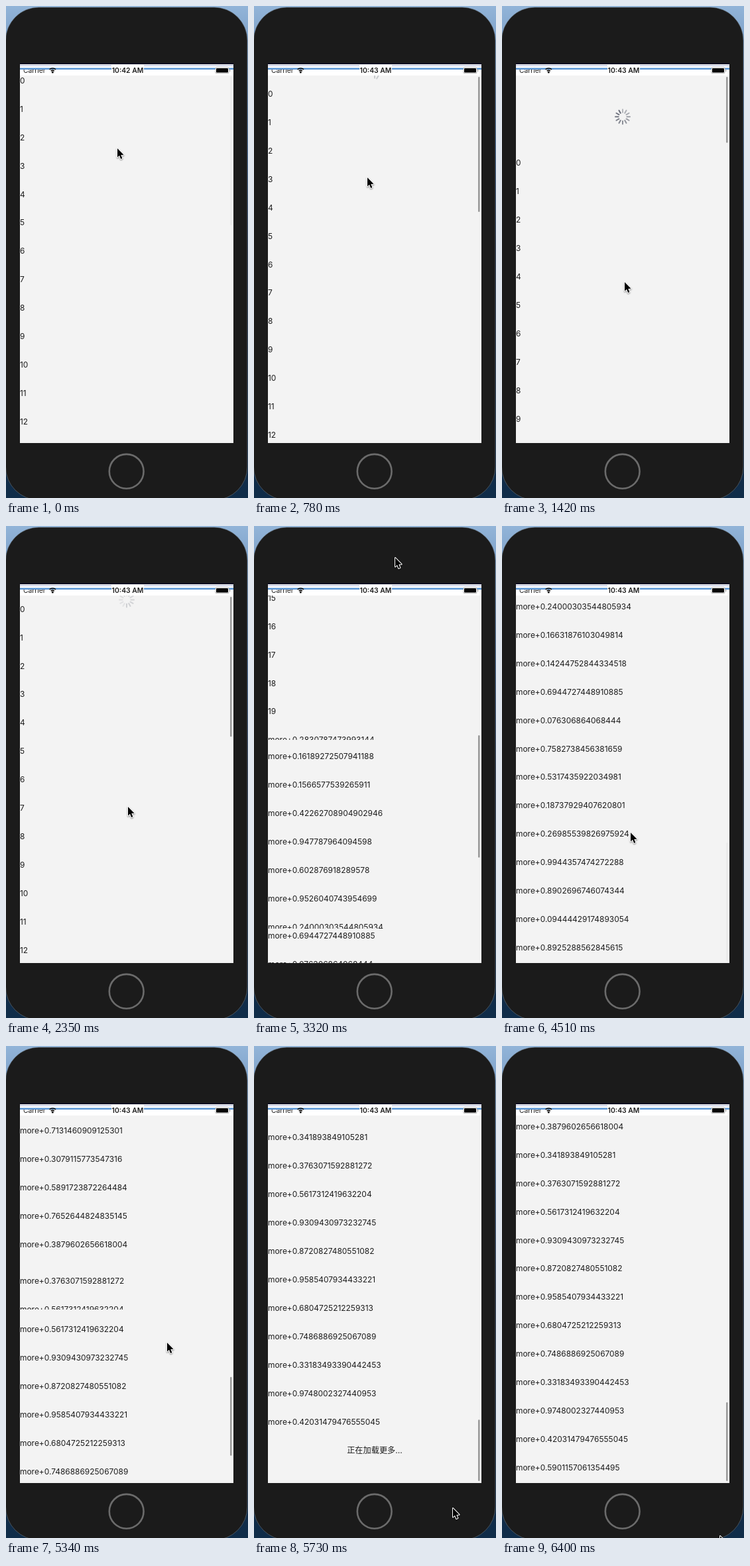
An HTML page with a canvas for the animation above (7.05 s loop, 365 by 743 pixels).

```html
<!DOCTYPE html>
<html lang="en">
<head>
<meta charset="utf-8">
<title>Pull to refresh</title>
<style>
html, body { margin: 0; width: 100%; height: 100%; overflow: hidden; background: #1b1b1b; }
canvas { display: block; }
</style>
</head>
<body>
<canvas id="stage" width="365" height="743"></canvas>
<script>
const ctx = document.getElementById('stage').getContext('2d');
const LOOP = 7050, STEP = 128;
const PITCH = 42.93;
const TOP = 105, BOTTOM = 660, LEFT = 21, WIDTH = 322, MID = 182;
const FONT = 'Inter, "Noto Sans CJK SC", "Noto Sans CJK", sans-serif';

const EASE = {
  line: p => p,
  in: p => p * p,
  out: p => p * (2 - p),
  smooth: p => p * p * (3 - 2 * p),
  hold: () => 0
};

// Pointer and scroll at the turning points; ease leads to the next one.
// Tears are bands [from y, extra scroll] of the screen drawn out of sync.
const POSES = [
  { t: 0, x: 168, y: 215, s: 0, ease: 'line' },
  { t: 390, x: 167, y: 205, s: 0, ease: 'line' },
  { t: 630, x: 168, y: 229, s: 0, ease: 'line' },
  { t: 1420, x: 185, y: 417, s: -124.5, ease: 'smooth' },
  { t: 1900, x: 184, y: 424, s: -51.5, ease: 'smooth' },
  { t: 2470, x: 184, y: 424, s: 0, ease: 'line' },
  { t: 2770, x: 183, y: 484, s: 0, ease: 'in' },
  { t: 3170, x: 207, y: 2, s: 420, ease: 'line' },
  { t: 3320, x: 213, y: 48, s: 648, ease: 'out', tears: [[323, 18], [608, 134]] },
  { t: 3860, x: 207, y: 433, s: 1171, ease: 'out' },
  { t: 4240, x: 198, y: 452, s: 1150, ease: 'line' },
  { t: 4510, x: 194, y: 463, s: 1150, ease: 'hold' },
  { t: 4790, x: 188, y: 496, s: 1150, ease: 'line' },
  { t: 4920, x: 183, y: 529, s: 1150, ease: 'in' },
  { t: 5220, x: 224, y: 200, s: 1640, ease: 'line' },
  { t: 5340, x: 243, y: 448, s: 1831, ease: 'out', tears: [[325, 30], [398, 0]] },
  { t: 5730, x: 300, y: 698, s: 2035, ease: 'out' },
  { t: 6400, x: 329, y: 740, s: 2008.7, ease: 'hold' }
];

const MORE = `2830787473993144 16189272507941188 1566577539265911 42262708904902946
  947787964094598 602876918289578 9526040743954699 24000303544805934 16631876103049814
  14244752844334518 6944727448910885 076306864068444 7582738456381659 5317435922034981
  18737929407620801 26985539826975924 9944357474272288 8902696746074344 09444429174893054
  8925288562845615 4718263905512847 6390172845527316 2057749381640925 7131460909125301
  3079115773547316 5891723872264484 7652644824835145 3879602656618004 341893849105281
  3763071592881272 5617312419632204 9309430973232745 8720827480551082 9585407934433221
  6804725212259313 7486886925067089 33183493390442453 9748002327440953 42031479476555045
  5901157061354495`.trim().split(/\s+/);
const ROWS = [...Array(20).keys()].map(String).concat(MORE.map(d => 'more+0.' + d));

// The picture advances in steps counted from the last turning point
function poseAt(t) {
  const i = POSES.findLastIndex(p => p.t <= Math.max(0, t));
  const a = POSES[i], b = POSES[i + 1] || a;
  const step = Math.floor((t - a.t) / STEP);
  const p = b === a ? 0 : EASE[a.ease](Math.max(0, step * STEP / (b.t - a.t)));
  const mix = k => a[k] + (b[k] - a[k]) * p;
  return { x: mix('x'), y: mix('y'), s: mix('s'), tears: step === 0 && a.tears || [] };
}

function rect(x, y, w, h, color) {
  ctx.fillStyle = color;
  ctx.fillRect(x, y, w, h);
}

function pill(x, y, w, h, r, color) {
  ctx.fillStyle = color;
  ctx.beginPath();
  ctx.roundRect(x, y, w, h, r);
  ctx.fill();
}

function arc(x, y, r, width, color, from = 0, to = 7) {
  ctx.strokeStyle = color;
  ctx.lineWidth = width;
  ctx.beginPath();
  ctx.arc(x, y, r, from, to);
  ctx.stroke();
}

function label(str, x, y, font, align = 'left') {
  ctx.font = font + ' ' + FONT;
  ctx.textAlign = align;
  ctx.fillStyle = '#1c1c1c';
  ctx.fillText(str, x, y);
}

function drawPhone() {
  const sky = ctx.createLinearGradient(0, 0, 0, 743);
  sky.addColorStop(0, '#92b4d8');
  sky.addColorStop(.3, '#3f679c');
  sky.addColorStop(.5, '#22304c');
  sky.addColorStop(1, '#0f2c49');
  rect(0, 0, 365, 743, sky);
  pill(-.5, 2, 364.5, 744, 50, '#1b1b1b');
  ctx.strokeStyle = 'rgba(110,122,134,.55)';
  ctx.lineWidth = 1;
  ctx.stroke();
  arc(181.7, 702.8, 25.9, 2.6, '#6b6b6b');
}

function drawStatus(t) {
  rect(LEFT, 86, WIDTH, 2, '#0d0d22');
  rect(LEFT, 88, WIDTH, 17, '#fff');
  label('Carrier', 26, 100.7, '400 10.3px');
  rect(LEFT, 89, WIDTH, 2, '#cdd2e6');
  rect(LEFT, 93, WIDTH, 3, '#a9cbee');
  rect(LEFT, 94, WIDTH, 2, '#5b95d4');

  arc(70.3, 101, 7, 1.7, '#111', -2.3, -.84);
  arc(70.3, 101, 3.8, 1.7, '#111', -2.3, -.84);
  arc(70.3, 100, .8, 1.5, '#111');

  rect(159, 89, 49, 16, '#fff');
  label(t < 780 ? '10:42 AM' : '10:43 AM', 183.5, 100.7, '600 10.4px', 'center');

  pill(315.5, 92.5, 21, 9.5, 2.5, '#aaa');
  pill(316.2, 93.2, 19.6, 8.1, 2, '#fff');
  pill(317, 94, 18, 6.5, 1.2, '#050505');
  pill(337.2, 95.5, 1.2, 3.5, .6, '#aaa');
}

function drawSpinner(t, s) {
  if (s > -3) return;
  const loading = t >= 1300;
  const blades = loading ? 12 : Math.min(12, Math.floor(-s / 7.5));
  const turn = Math.floor(t / STEP);
  ctx.save();
  ctx.translate(MID, TOP - s / 2);
  ctx.globalAlpha = Math.min(1, -s / 50);
  ctx.lineWidth = 2;
  ctx.lineCap = 'round';
  for (let i = 0; i < blades; i++) {
    const fade = loading ? 1 - .05 * ((turn + 12 - i) % 12) : .75;
    ctx.strokeStyle = `rgba(104,108,120,${fade})`;
    ctx.save();
    ctx.rotate(i * Math.PI / 6);
    ctx.beginPath();
    ctx.moveTo(0, -6.4);
    ctx.lineTo(0, -11);
    ctx.stroke();
    ctx.restore();
  }
  ctx.restore();
}

function drawThumb(t, s) {
  const rows = t < 3000 ? 32 : t < 4790 ? 40 : 60;
  const view = BOTTOM - TOP, height = rows * PITCH - 12, max = height - view;
  const over = Math.max(0, -s, s - max);
  const len = (view - 5) * view / height - over;
  const progress = Math.min(1, Math.max(0, s / max));
  const top = 107 + (view - 5 - len) * progress;
  const moving = Math.abs(poseAt(t).s - poseAt(t - 250).s) > 4;
  pill(338, top, 2.6, len, 1.3, `rgba(0,0,0,${moving ? .36 : .03})`);
}

function drawBand(t, s, from, to) {
  ctx.save();
  ctx.beginPath();
  ctx.rect(LEFT, from, WIDTH, to - from);
  ctx.clip();
  rect(LEFT, from, WIDTH, to - from, '#f3f3f3');
  // The last row shows a notice until the next page has arrived
  const last = t < 4390 || t > 6040 && t < 0 ? 39 : 59;
  const pending = t < 4390 || (t > 4920 && t < 6040);
  const first = Math.max(0, Math.floor((s - 30) / PITCH));
  for (let i = first; i <= Math.min(last, first + 15); i++) {
    const y = 116.8 + i * PITCH - s;
    if (pending && i === last) label('正在加载更多...', MID, y + .4, '400 12.2px', 'center');
    else label(ROWS[i], LEFT, y, '400 11.93px');
  }
  drawSpinner(t, s);
  drawThumb(t, s);
  ctx.restore();
}

function drawList(t, { s, tears }) {
  const bands = [[TOP, 0], ...tears, [BOTTOM, 0]];
  for (let i = 0; i < bands.length - 1; i++) {
    drawBand(t, s + bands[i][1], bands[i][0], bands[i + 1][0]);
  }
}

const ARROW = new Path2D('M0 0V13.6L3 10.8L5.2 16L7.4 15L5.3 10L9.6 9.7Z');

function drawPointer({ x, y }) {
  ctx.save();
  ctx.translate(Math.round(x), Math.round(y));
  ctx.lineJoin = 'round';
  ctx.lineWidth = 2;
  ctx.strokeStyle = '#fff';
  ctx.shadowColor = 'rgba(0,0,0,.45)';
  ctx.shadowBlur = 2;
  ctx.shadowOffsetY = 1;
  ctx.stroke(ARROW);
  ctx.shadowColor = 'transparent';
  ctx.fillStyle = '#000';
  ctx.fill(ARROW);
  ctx.restore();
}

const start = performance.now();

function render() {
  const t = Math.max(0, performance.now() - start) % LOOP;
  const pose = poseAt(t);
  drawPhone();
  drawList(t, pose);
  drawStatus(t);
  drawPointer(pose);
  requestAnimationFrame(render);
}
render();
</script>
</body>
</html>
```
